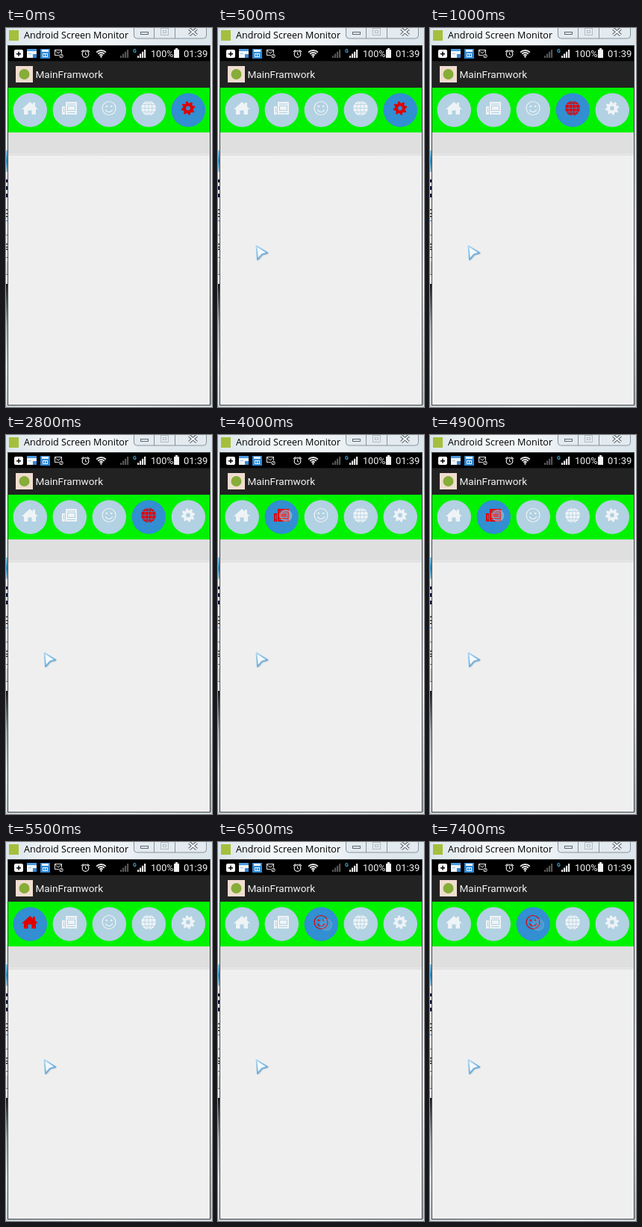
Recreate the animation shown at these times as an HTML page with a canvas. Size 276 by 508 pixels, loop 8000 ms.

```html
<!DOCTYPE html>
<html lang="en">
<head>
<meta charset="utf-8">
<title>Tab bar demo</title>
<style>
html, body { margin: 0; width: 100%; height: 100%; overflow: hidden; background: #efefef; }
canvas { display: block; width: 276px; height: 508px; }
</style>
</head>
<body>
<canvas id="stage"></canvas>
<script>
const W = 276, H = 508, LOOP = 8000;
const RED = '#e00000', PALE = '#eef3f6', TAB = '#b2d1e2', ACTIVE = '#318fd2';
const canvas = document.getElementById('stage');
const c = canvas.getContext('2d');
const dpr = window.devicePixelRatio || 1;
canvas.width = W * dpr;
canvas.height = H * dpr;
c.scale(dpr, dpr);

// start time, selected tab, touch point
const STEPS = [
  [0, 4], [1000, 3], [4000, 1, [91, 108]], [5500, 0], [6500, 2, [145, 111]]
];

function box(x, y, w, h, fill) {
  c.fillStyle = fill;
  c.fillRect(x, y, w, h);
}
function frame(x, y, w, h, color, lw = 1) {
  c.strokeStyle = color;
  c.lineWidth = lw;
  c.strokeRect(x, y, w, h);
}
function disc(x, y, r, fill) {
  c.fillStyle = fill;
  c.beginPath();
  c.arc(x, y, r, 0, 7);
  c.fill();
}
function ring(x, y, r, color, lw = 1) {
  c.strokeStyle = color;
  c.lineWidth = lw;
  c.beginPath();
  c.arc(x, y, r, 0, 7);
  c.stroke();
}
function poly(points, fill) {
  c.fillStyle = fill;
  c.beginPath();
  points.forEach(([x, y]) => c.lineTo(x, y));
  c.closePath();
  c.fill();
}
function line(points, color, lw = 1) {
  c.strokeStyle = color;
  c.lineWidth = lw;
  c.beginPath();
  points.forEach(([x, y]) => c.lineTo(x, y));
  c.stroke();
}
function text(s, x, y, font, fill) {
  c.font = font;
  c.fillStyle = fill;
  c.fillText(s, x, y);
}
function fade(x0, y0, x1, y1, ...colors) {
  const g = c.createLinearGradient(x0, y0, x1, y1);
  colors.forEach((col, i) => g.addColorStop(i / (colors.length - 1), col));
  return g;
}

function titleBar() {
  box(0, 0, W, 24, fade(0, 0, W, 0, '#d9e4ea', '#f4f7f8', '#f1f5f7', '#e0e9ee', '#dbe5eb'));
  box(4, 3, 13, 14, '#a5bf3c');
  text('Android Screen Monitor', 24, 14, '12.6px "Open Sans", "Noto Sans", sans-serif', '#000');

  c.beginPath();
  c.roundRect(171.5, -6, 97, 20, 4);
  c.fillStyle = '#e4ebf0';
  c.fill();
  c.strokeStyle = '#87929c';
  c.lineWidth = 1;
  c.stroke();
  line([[198.5, 0], [198.5, 14]], '#87929c');
  line([[226.5, 0], [226.5, 14]], '#87929c');
  frame(180.5, 5.5, 10, 3, '#5e6874');
  frame(207.5, .5, 10, 9, '#b4bdc5');
  frame(210.5, 3.5, 4, 3, '#b4bdc5');
  for (const [color, lw] of [['#59616c', 4.2], ['#f5f7f8', 2]]) {
    line([[245.5, 1], [255.5, 9.5]], color, lw);
    line([[255.5, 1], [245.5, 9.5]], color, lw);
  }
}

function windowEdges() {
  box(0, 24, 3, 140, '#e3eaee');
  box(0, 164, 3, 29, fade(0, 164, 0, 193, '#86c6e4', '#2e8fc2', '#a9c6d6'));
  box(0, 193, 3, 150, '#fbfbfb');
  box(0, 203, 2, 4, '#101a3c');
  box(0, 212, 2, 5, '#101a3c');
  box(0, 222, 3, 5, '#101a3c');
  for (const y of [243, 248, 252, 289, 293, 296]) box(0, y, 3, 1.4, '#222');
  box(0, 258, 3, 1, '#3d87c8');
  box(0, 277, 3, 1, '#777');
  box(0, 307, 3, 1, '#777');
  box(0, 313, 3, 17, '#d7d7d7');
  box(0, 330, 3, 1, '#777');
  box(0, 343, 3, 165, fade(0, 343, 0, 508, '#17191b', '#a9b3b8', '#e4eaec', '#cfd7db'));
  box(273, 24, 3, 484, fade(0, 24, 0, 508, '#e0e8ec', '#d3dce1', '#e7edf0', '#aab4ba'));
  box(0, 505, W, 3, fade(0, 0, W, 0, '#c9d2d6', '#e8eef0', '#d0d9dd'));
  frame(2.5, 23.5, 271, 482, '#3c4043');
}

function signal(x, y, w, h, color) {
  const step = w / 4;
  for (let i = 0; i < 4; i++) {
    const bar = h * (i + 1) / 4;
    box(x + i * step, y - bar, step - .8, bar, color);
  }
}

function statusBar() {
  box(3, 24, 270, 20, '#000');
  c.beginPath();
  c.roundRect(11, 29, 12, 11, 2);
  c.fillStyle = '#fff';
  c.fill();
  box(14, 34, 6, 1.5, '#000');
  box(16.3, 31.7, 1.5, 6, '#000');

  box(28, 28, 13, 12, '#f0f5fa');
  box(28, 28, 13, 3, '#4b9ae0');
  box(36, 35, 5, 5, '#3686d5');
  box(30, 34, 4, 1, '#a8c4de');

  box(46, 28, 13, 13, '#2b8ada');
  box(48, 29, 9, 3, '#e4f1fb');
  frame(49.5, 34.5, 6, 4, '#e4f1fb');
  box(52, 34, 1, 5, '#e4f1fb');

  frame(65.5, 29.5, 9, 7, '#ddd');
  line([[65.5, 30], [70, 34], [74.5, 30]], '#ddd');
  disc(74, 37.5, 3.2, '#000');
  ring(74, 37.5, 2.3, '#ddd');
  line([[72.5, 39], [75.5, 36]], '#ddd');

  ring(106.5, 35, 4.3, '#e6e6e6', 1.2);
  line([[106.5, 32.5], [106.5, 35.5], [108.5, 36]], '#e6e6e6');
  line([[101, 32], [104, 29.5]], '#e6e6e6', 1.3);
  line([[109, 29.5], [112, 32]], '#e6e6e6', 1.3);

  for (const r of [9, 6, 3]) {
    c.strokeStyle = '#e8e8e8';
    c.lineWidth = 1.8;
    c.beginPath();
    c.arc(127.5, 39, r, -Math.PI * .75, -Math.PI * .25);
    c.stroke();
  }
  disc(127.5, 38.5, 1.2, '#e8e8e8');

  signal(153, 40, 12, 11, '#555');
  text('G', 170, 33, 'bold 7px Roboto, sans-serif', '#45b3e6');
  signal(176, 40, 12, 11, '#e8e8e8');
  text('100%', 194, 39, '12.6px Roboto, sans-serif', '#f2f2f2');
  box(225, 29, 7, 11, '#f2f2f2');
  box(227, 27, 3, 2, '#f2f2f2');
  text('01:39', 238, 39, '13px Roboto, sans-serif', '#f2f2f2');
}

function actionBar() {
  box(3, 44, 270, 36, '#222');
  box(3, 44, 270, 1, '#161616');
  box(13, 51, 23, 22, '#f1ddd0');
  disc(24.5, 62, 7, '#86ad38');
  text('MainFramwork', 39.5, 67, '13.6px Roboto, sans-serif', '#f4f4f4');
}

const icons = [
  function home(x, color) {
    poly([[x - 11, 109], [x, 99], [x + 4, 102.6], [x + 4, 100], [x + 7, 100],
      [x + 7, 105.3], [x + 11, 109], [x + 8, 109], [x + 8, 116], [x + 2.5, 116],
      [x + 2.5, 110.5], [x - 2.5, 110.5], [x - 2.5, 116], [x - 8, 116], [x - 8, 109]], color);
  },
  function news(x, color, back) {
    box(x - 10, 105, 4, 11, color);
    box(x - 5, 99, 15, 17, color);
    box(x - 8, 107, 1, 6, back);
    box(x - 3, 101.5, 11, 1, back);
    frame(x - 2.5, 104.5, 10, 6, back);
    box(x - 3, 113, 11, 1, back);
  },
  function smile(x, color) {
    ring(x, 107.5, 9, color, 1.2);
    disc(x - 3.2, 105, 1.3, color);
    disc(x + 3.2, 105, 1.3, color);
    c.lineWidth = 1.2;
    c.beginPath();
    c.arc(x, 107.5, 5, .35, Math.PI - .35);
    c.stroke();
  },
  function globe(x, color, back) {
    disc(x, 107.5, 9.8, color);
    c.strokeStyle = back;
    c.lineWidth = .8;
    c.beginPath();
    c.moveTo(x, 98);
    c.lineTo(x, 117);
    for (const [dy, half] of [[-5, 8], [0, 10], [5, 8]]) {
      c.moveTo(x - half, 107.5 + dy);
      c.lineTo(x + half, 107.5 + dy);
    }
    c.moveTo(x + 5, 107.5);
    c.ellipse(x, 107.5, 5, 9.6, 0, 0, 7);
    c.stroke();
  },
  function gear(x, color, back) {
    const teeth = [];
    for (let i = 0; i < 32; i++) {
      const a = (i - .5) * Math.PI / 16 - Math.PI / 16;
      const r = i % 4 < 2 ? 9.3 : 6.9;
      teeth.push([x + r * Math.cos(a), 107.5 + r * Math.sin(a)]);
    }
    poly(teeth, color);
    disc(x, 107.5, 2.9, back);
  }
];

function tabs(active) {
  box(3, 80, 270, 60, '#00f200');
  icons.forEach((icon, i) => {
    const x = 32 + 53 * i, on = i === active;
    const back = on ? ACTIVE : TAB;
    disc(x + .3, 110, 22.7, back);
    icon(x, on ? RED : PALE, back);
  });
}

function content() {
  box(3, 140, 270, 365, '#efefef');
  box(3, 140, 270, 28, '#dfdfdf');
  box(3, 168, 270, 3, '#e5e5e5');
  for (let x = 3; x < 273; x += 2) box(x, 170, 1, 1, '#d9d9d9');
}

function touch([x, y]) {
  disc(x, y, 8.5, 'rgba(190,205,220,.36)');
  ring(x, y, 7, 'rgba(225,230,238,.25)', 1.5);
}

function pointer() {
  const arrow = [[51.5, 292], [66.5, 301.5], [59, 303.5], [53, 310.5]];
  c.save();
  c.lineJoin = 'round';
  c.shadowColor = 'rgba(60,90,120,.45)';
  c.shadowBlur = 2 * dpr;
  c.shadowOffsetX = c.shadowOffsetY = dpr;
  poly(arrow, '#f3f9fd');
  c.shadowColor = 'transparent';
  c.strokeStyle = fade(51, 291, 64, 309, '#b5dcf5', '#5a9fd0');
  c.lineWidth = 2;
  c.stroke();
  c.restore();
}

function render(t) {
  const [, active, point] = STEPS.findLast(s => t >= s[0]);
  c.clearRect(0, 0, W, H);
  titleBar();
  windowEdges();
  statusBar();
  actionBar();
  tabs(active);
  if (point) {
    c.globalAlpha = active === 2 ? .45 : 1;
    touch(point);
    c.globalAlpha = 1;
  }
  content();
  if (t >= 500) pointer();
}

const start = performance.now();
function tick() {
  render((performance.now() - start) % LOOP);
  requestAnimationFrame(tick);
}
tick();
</script>
</body>
</html>
```
